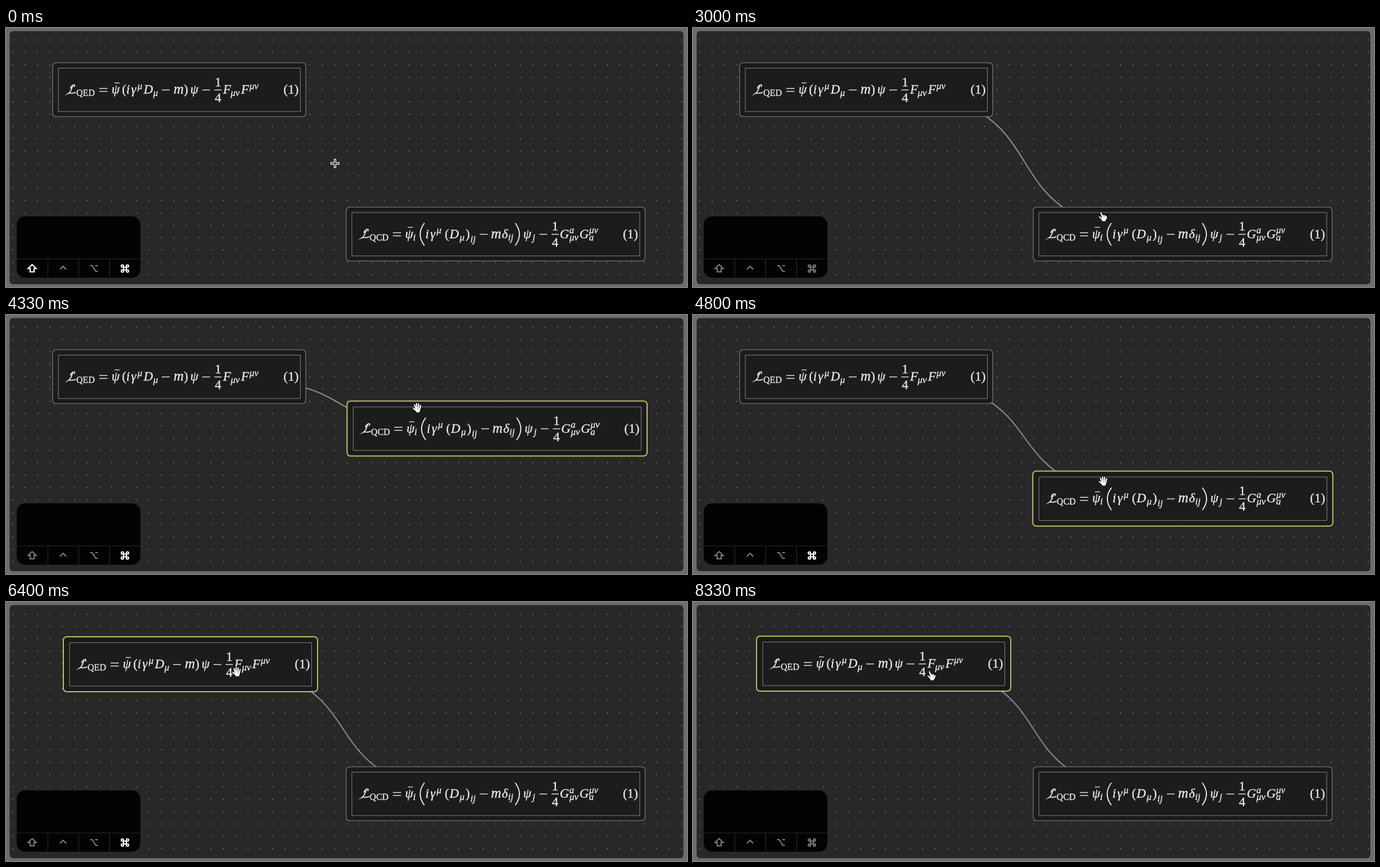
These frames come from a looping animation (1211x462 px, 8400 ms). An HTML page with a canvas:

```html
<!DOCTYPE html>
<html lang="en">
<head>
<meta charset="utf-8">
<title>Linked formulas</title>
<style>
html, body { margin: 0; width: 100%; height: 100%; overflow: hidden; background: #6c6c6c; }
canvas { display: block; }
</style>
</head>
<body>
<canvas width="1211" height="462"></canvas>
<script>
const c = document.querySelector('canvas').getContext('2d');
const LOOP = 8400, STEP = 1000 / 15, PITCH = 22.02;
const SERIF = '"Liberation Serif", "Noto Serif", serif';
const INK = '#ececec', LINE = '#858585';

// Symbols are centred on x; heights are relative to the baseline.
const qed = {
  x: 83, y: 62, w: 450, h: 96, name: 'QED', tag: 507,
  main: [['ψ', 195], ['i', 217], ['γ', 227], ['D', 253], ['m', 307, 25], ['ψ', 335], ['F', 393], ['F', 425]],
  roman: [['(', 210], [')', 320]],
  sup: [['μ', 238], ['μν', 441]],
  sub: [['μ', 266], ['μν', 407.5]],
  minus: [284, 356], frac: 377, bar: 197.5, big: []
};
const qcd = {
  x: 605, y: 319.5, w: 531.5, h: 96, name: 'QCD', tag: 1110.5,
  main: [['ψ', 717], ['i', 749], ['γ', 759], ['D', 797], ['m', 871.5, 25], ['δ', 887], ['ψ', 927], ['G', 993], ['G', 1028]],
  roman: [['(', 784], [')', 821]],
  sup: [['μ', 770], ['a', 1006], ['μν', 1045]],
  sub: [['i', 726], ['μ', 811], ['ij', 830.5, 3], ['ij', 897.5], ['j', 938.5], ['μν', 1010], ['a', 1041]],
  minus: [849.5, 955.5], frac: 976.5, bar: 719, big: [[744, -1], [905.5, 1]]
};

// Each key: time, x, y
const pointerKeys = [
  [0, 585, 241], [640, 355, 145], [760, 355, 145], [1521, 728, 336], [3600, 728, 336],
  [4333, 730, 165], [4400, 730, 165], [4900, 728, 311], [5050, 728, 311], [5600, 389, 122],
  [5800, 389, 122], [6130, 470, 118], [6400, 409, 124], [6700, 420, 123], [7300, 420, 123], [8000, 423, 131]
];
const qedKeys = [[5800, 0, 0], [6130, 81, -4], [6400, 20, 1], [6700, 31, 0]];
const qcdKeys = [[3600, 0, 0], [4333, 2.5, -165], [4400, 2.5, -165], [4900, 0, -25.5]];

function at(keys, t) {
  const i = keys.findIndex(k => k[0] > t);
  if (i < 0) return keys[keys.length - 1].slice(1);
  if (!i) return keys[0].slice(1);
  const a = keys[i - 1], b = keys[i];
  const p = (t - a[0]) / (b[0] - a[0]), s = p * p * (3 - 2 * p);
  return [a[1] + (b[1] - a[1]) * s, a[2] + (b[2] - a[2]) * s];
}

const between = (t, a, b) => t >= a && t < b;

function box(x, y, w, h, r, fill, stroke, width = 1) {
  c.beginPath();
  c.roundRect(x, y, w, h, r);
  if (fill) { c.fillStyle = fill; c.fill(); }
  if (stroke) { c.strokeStyle = stroke; c.lineWidth = width; c.stroke(); }
}

function line(x1, y1, x2, y2, color, width) {
  c.beginPath();
  c.moveTo(x1, y1);
  c.lineTo(x2, y2);
  c.strokeStyle = color;
  c.lineWidth = width;
  c.stroke();
}

function path(d, x, y, color, width) {
  c.save();
  c.translate(x, y);
  c.strokeStyle = color;
  c.lineWidth = width;
  c.stroke(new Path2D(d));
  c.restore();
}

function text(s, x, y, size, style = '') {
  c.font = `${style} ${size}px ${SERIF}`;
  c.fillText(s, x, y);
  c.strokeStyle = INK;
  c.lineWidth = 0.35;
  c.strokeText(s, x, y);
}

function drawNode(n, [dx, dy], active) {
  c.save();
  c.translate(dx, dy);
  const grow = active ? 1 : 0;
  box(n.x - grow, n.y - grow, n.w + 2 * grow, n.h + 2 * grow, 6, '#1b1b1b',
    active ? '#c3bf62' : LINE, active ? 2 : 1.1);
  box(n.x + 10, n.y + 9.5, n.w - 19.5, n.h - 18.5, 0, '#1c1c1c', LINE);

  const x = n.x + 27, base = n.y + 55, mid = base - 6.5;
  c.fillStyle = INK;
  c.textAlign = 'center';
  path('M4.500 -9C5 -13 9 -16 11.500 -15.500C13 -15 12 -12.500 10.500 -12M9 -15C7 -11 6.500 -4 1.500 -.500C5 -2 9 1.500 14 -2.500', x, base, INK, 1.8);
  text(n.name, x + 31.5, base + 4, 16);
  for (const y of [-2.7, 2.7]) line(x + 56, mid + y, x + 70.5, mid + y, INK, 1.4);
  for (const [s, px, size = 23] of n.main) text(s, px, base, size, 'italic');
  for (const [s, px] of n.roman) text(s, px, base, 23);
  for (const [s, px] of n.sup) text(s, px, base - 8.5, 17, 'italic');
  for (const [s, px, drop = 0] of n.sub) text(s, px, base + 4 + drop, 17, 'italic');
  for (const m of n.minus) line(m - 7, mid, m + 7, mid, INK, 1.4);
  line(n.bar - 4.5, base - 19, n.bar + 4.5, base - 19, INK, 1.3);
  for (const [px, side] of n.big) {
    c.beginPath();
    c.moveTo(px, mid - 20);
    c.quadraticCurveTo(px + side * 15, mid, px, mid + 20);
    c.strokeStyle = INK;
    c.lineWidth = 1.9;
    c.stroke();
  }
  text('1', n.frac, base - 13.5, 23);
  text('4', n.frac, base + 15, 23);
  line(n.frac - 6.5, mid, n.frac + 6.5, mid, INK, 1.4);
  text('(1)', n.tag, base, 23);
  c.restore();
}

function drawEdge(x1, y1, x2, y2) {
  const reach = (x2 - x1) * 0.72;
  c.beginPath();
  c.moveTo(x1, y1);
  c.bezierCurveTo(x1 + reach, y1, x2 - reach, y2, x2, y2);
  c.strokeStyle = '#8b8b8b';
  c.lineWidth = 2.1;
  c.stroke();
}

const keyIcons = [
  'M0 -7L7 0H3.500V6H-3.500V0H-7Z',
  'M-5.500 1.500L0 -4L5.500 1.500',
  'M-7 -5H-3L3 5H7M2 -5H7',
  'M-2.500 -2.500H2.500V2.500H-2.500ZM-2.500 -2.500H-4.500A2 2 0 1 1 -2.500 -4.500Z' +
  'M2.500 -2.500V-4.500A2 2 0 1 1 4.500 -2.500Z' +
  'M2.500 2.500H4.500A2 2 0 1 1 2.500 4.500Z' +
  'M-2.500 2.500V4.500A2 2 0 1 1 -4.500 2.500Z'
];

function drawKeys(t) {
  box(19, 336, 220, 109.5, 15, '#030303');
  line(19, 412, 239, 412, '#2b2b2b', 1);
  for (const x of [74.5, 129.5, 184.5]) line(x, 412, x, 445, '#2b2b2b', 1);
  const linking = t < 1900, command = linking || between(t, 3400, 7000);
  [linking, false, false, command].forEach((on, i) =>
    path(keyIcons[i], 46.5 + 55 * i, 429, on ? '#fff' : '#7a7a7a', 2.2));
}

const fingers = {
  point: 'M-3.500 -6.500L-.500 3M.300 -1.500L1 4M3.200 -1L3.500 4M6 .500L5.500 4M-6 1L-1.500 5',
  grab: 'M-4.500 -4.500L-1.500 3M-1 -6.800L0 2M2.700 -6.300L2.500 2M6.300 -3.500L4.800 3M-6.500 1.500L-2 5'
};
const palm = new Path2D('M-2.500 3L5.500 3L5 6L4 8.500H-1L-3 5Z');

function drawHand(kind, x, y) {
  c.lineCap = c.lineJoin = 'round';
  for (const [color, width] of [['#111', 4.4], ['#fff', 2.3]]) {
    path(fingers[kind], x, y, color, width);
    c.save();
    c.translate(x, y);
    c.fillStyle = c.strokeStyle = color;
    c.lineWidth = width - 2;
    c.fill(palm);
    c.stroke(palm);
    c.restore();
  }
  c.lineCap = 'butt';
  c.lineJoin = 'miter';
}

function drawCross(x, y) {
  for (const [r, color, width] of [[8, '#fff', 4.2], [6.8, '#222', 1.6]]) {
    line(x - r, y, x + r, y, color, width);
    line(x, y - r, x, y + r, color, width);
  }
}

function draw(t) {
  c.fillStyle = '#6c6c6c';
  c.fillRect(0, 0, 1211, 462);
  box(6.5, 5.5, 1198, 451.5, 6, '#282828');
  c.fillStyle = '#7a7a7a';
  for (let x = 12; x < 1204; x += PITCH)
    for (let y = 21.6; y < 456; y += PITCH) {
      c.beginPath();
      c.arc(x, y, 1, 0, 7);
      c.fill();
    }

  const [px, py] = at(pointerKeys, t);
  const a = at(qedKeys, t), b = at(qcdKeys, t);
  const ax = 308 + a[0], ay = 110 + a[1];
  if (between(t, 760, 1521)) drawEdge(ax, ay, px - 7, py - 6);
  else if (t >= 1521) drawEdge(ax, ay, 871 + b[0], 367.5 + b[1]);

  drawNode(qed, a, t >= 5650);
  drawNode(qcd, b, between(t, 3600, 5650));
  drawKeys(t);

  if (t < 1900) drawCross(px, py + 0.5);
  else drawHand(between(t, 3600, 6900) ? 'grab' : 'point', px + 1, py);
}

const start = performance.now();
function tick() {
  const t = (performance.now() - start) % LOOP;
  draw(Math.min(125, Math.floor((t + 5) / STEP)) * STEP);
  requestAnimationFrame(tick);
}
tick();
</script>
</body>
</html>
```
